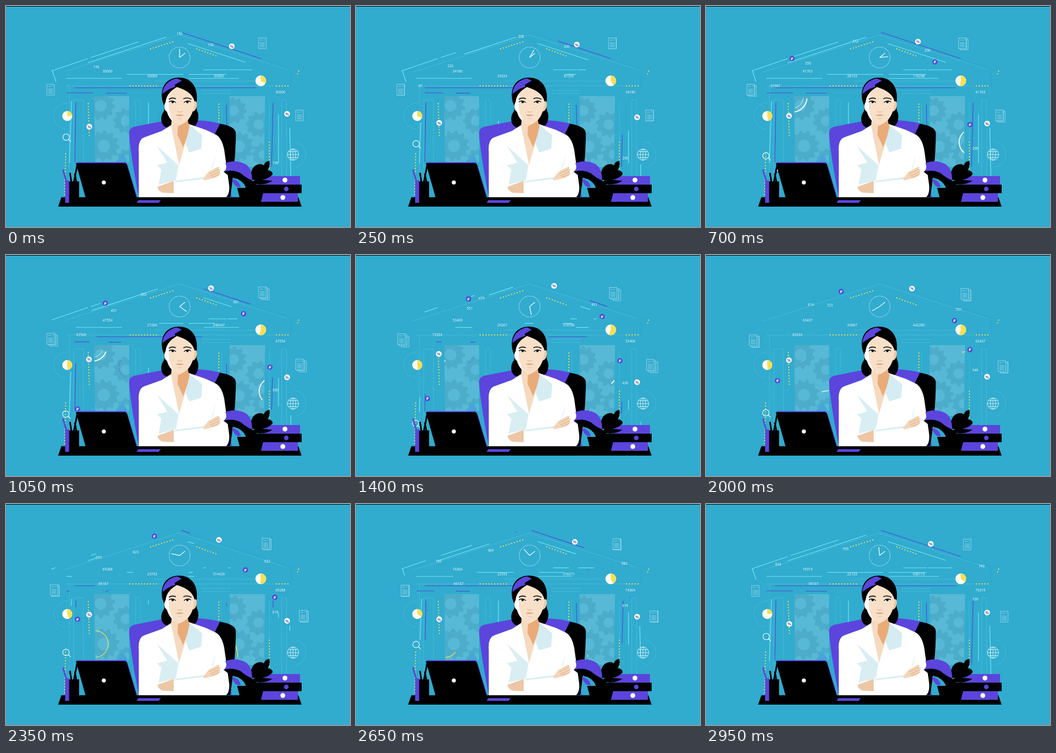
Recreate the animation shown at these times as an HTML page. Size 640 px wide and 412 px high, loop 3020 ms.

```html
<!DOCTYPE html>
<html lang="en">
<head>
<meta charset="utf-8">
<title>Banking office</title>
<style>
  html, body { margin: 0; width: 100%; height: 100%; overflow: hidden; background: #31abce; }
  svg { display: block; width: 100vw; height: 100vh; }
  text { font-family: "Open Sans", "Noto Sans", sans-serif; text-anchor: middle; }
  .num { font-size: 6.4px; fill: #f2ffff; }
  .line { fill: none; stroke-width: 1.2; }
  .dots { fill: none; stroke: #83e6f5; stroke-width: .9; stroke-dasharray: 1 2.4; }
  .gold { fill: none; stroke: #f5e25c; stroke-width: 2.3; stroke-linecap: round; stroke-dasharray: 0 5.4; }
  .icon { fill: none; stroke: #e9fbff; stroke-width: .8; }
  .sheet { fill: none; stroke: #b4e3f0; stroke-width: .7; }
</style>
</head>
<body>
<svg viewBox="0 0 640 412">
  <defs>
    <clipPath id="leftPane"><path d="M164 168H229V291H166Z"/></clipPath>
    <clipPath id="rightPane"><path d="M416 168H482L480 300H417Z"/></clipPath>
    <clipPath id="counterEdge"><rect x="115.5" y="140" width="140" height="20"/></clipPath>
  </defs>
  <rect width="640" height="412" fill="#31abce"/>
  <rect width="640" height="1" fill="#000"/>
  <g id="left" clip-path="url(#leftPane)"><rect x="160" y="165" width="72" height="130" fill="#57b9d5"/></g>
  <g id="right" clip-path="url(#rightPane)"><rect x="412" y="165" width="72" height="140" fill="#57b9d5"/></g>

  <g class="dots">
    <path d="M107 123 322 54 522 118"/>
    <path d="M277 140H465M113 149H230M282 149H500M365 157.500H417M365 163H417"/>
    <path d="M118 356V149M126 356V175H144V290M513 317V175H522V317"/>
    <path d="M241 222V178Q241 174 245.500 174T250 178V218M401 215V180M490 250V180"/>
    <path d="M114 181A24 24 0 0 0 112 229M537 253A24 24 0 0 1 540 300"/>
  </g>
  <path d="M330 51 540 120M530 124V150" class="dots" style="stroke:#2784c4;opacity:.6"/>
  <g class="gold">
    <path d="M269 80 313 66M355 80 391 93M231 149H281M503 149H527M153 182 155 244M396 183V221M111 276 109 353M490 254V306M544.500 121.500 542 128"/>
  </g>
  <g id="scene"></g>
  <g class="icon" transform="translate(534 277)">
    <circle r="10.500"/><ellipse rx="5" ry="10.500"/><path d="M0-10.500V10.500M-10.500 0H10.500M-9-5.500H9M-9 5.500H9"/>
  </g>
  <g class="icon" transform="translate(323 96)">
    <circle r="19.500" stroke-width="1.200" stroke-dasharray="1.200 1.800"/>
    <path d="M0 0 10-8" stroke-width="1.400"/><path id="minute" d="M0 0V-16" stroke-width="1.400"/>
  </g>

  <!-- chair -->
  <path d="M247 356C240 320 231 270 229 238Q228 228 239 225L290 215C330 211 370 211 401 220L420 356Z" fill="#5b45dc"/>
  <path d="M398 219.500Q426 224 427.500 236C428 270 423 320 417 356H390L383 250Z"/>
  <!-- hair and face -->
  <path d="M321 133.500C300 134 288 149 290 171 291 182 297 186 294 196 286 206 287 223 300 227H342C355 226 360 212 357 199 352 190 356 178 355 165 353 145 340 133 321 133.500Z"/>
  <path d="M291 164C292 147 305 137 318 135L327 139 314 147 315 151C304 153 298 159 291 164Z" fill="#5b45dc"/>
  <path d="M309 205 338 208 339 222 352 230 340 262 322 296 301 240 307 224Z" fill="#f5dac0"/>
  <path d="M348 180Q356 173 355 186 353 197 346 197Z" fill="#efc8a5"/>
  <path d="M298 178Q292 184 296 194L302 200Z" fill="#fff4ea"/>
  <path d="M318 151C306 158 298 166 297 180 298 197 302 208 312 217Q322 225 333 218C344 209 349 196 351 180 349 166 337 157 318 151Z" fill="#f8e0c8"/>
  <path d="M304 163C299 169 297 176 297 182 298 197 302 208 311 216 306 205 302 194 303 180Z" fill="#fff"/>
  <path d="M303 174Q309 169.500 316 173M330 173Q337 169.500 345 174" fill="none" stroke="#1a1010" stroke-width="1.800"/>
  <path d="M303 179Q309 174.500 316 180 309 183 303 179ZM331 180Q338 174.500 344 179 338 183 331 180Z" fill="#fff"/>
  <path d="M303 179Q309 174.500 316 180M331 180Q338 174.500 344 179" fill="none" stroke="#000" stroke-width="1.300"/>
  <circle cx="310" cy="179" r="2.300"/><circle cx="337.500" cy="179" r="2.300"/>
  <path d="M319 196.500Q323 199 328 196.500" fill="none" stroke="#dcae88" stroke-width="1.200"/>
  <path d="M315 203.500Q323 201 331 203.500 323 207 315 203.500Z" fill="#dda582"/>
  <path d="M319 210H327" stroke="#eac4a5" stroke-width="1.200"/>
  <!-- jacket -->
  <path d="M247 357V272Q245 249 258 244.500L290 233 307 222 322 296 340 220 372 231 391 240Q402 247 406 268L415 333Q417 350 409 357Z" fill="#fff"/>
  <path d="M307 222 312 217 322 223 332 251 322 295Z" fill="#f5dac0"/>
  <path d="M320 224Q332 219 338 213L340 220 343 228 330 264 319 240Z" fill="#e9ab78"/>
  <path d="M340 235 322 296 330 262Z" fill="#f5dac0"/>
  <path d="M342 222 365 241 363 266 341 273 334 257Z" fill="#d4ecf2"/>
  <path d="M281 261 321 297 316 325 284 333 289 305 281 297 300 292ZM385 300 391 276 382 304ZM315 326 368 319 371 322 314 329Z" fill="#d9eef3"/>
  <path d="M282 337 312 326V349L291 348Q282 344 282 337Z" fill="#edc7a5"/>
  <path d="M366 323 377 309 394 300Q399 299 396 304L400 305 397 309 399 313 392 319 370 325Z" fill="#f3d5b8"/>
  <path d="M378 313 396 304M380 317 398 309M382 320 397 314" stroke="#dcaa83" fill="none"/>
  <!-- desk -->
  <path d="M103 356.500H544L550 374H97Z"/>
  <path d="M246 362H288L284 367H243Z" fill="#5b45dc"/>
  <path d="M106 305 114 333" stroke="#5b45dc" stroke-width="3"/>
  <path d="M119 311 122 331M133 294 126 330M128 312 131 329" stroke="#000" stroke-width="3"/>
  <path d="M116 327H136V358H116Z"/>
  <path d="M110 325H117.500V367H110Z" fill="#5b45dc"/>
  <path d="M130 291H222L226 296 244 356H241Z" fill="#5b45dc"/>
  <path d="M130 293H221Q224 293 225 296L243 357H148Z"/>
  <circle cx="182" cy="329" r="3.800" fill="#fff"/>
  <!-- books -->
  <path d="M482 317H547V334H478Z" fill="#5b45dc"/>
  <path d="M464 333H550V349H464Z"/>
  <path d="M478 349H543V365H474Z" fill="#5b45dc"/>
  <circle cx="519" cy="324.500" r="4.500" fill="#fff"/>
  <circle cx="521.500" cy="341" r="4.300" fill="#5b45dc"/>
  <circle cx="515" cy="357" r="4.500" fill="#fff"/>
  <!-- plant -->
  <path d="M430 339H481L474 366H437Z"/>
  <path d="M405 309Q424 301 440 309 455 314 459 327L466 323 478 324 496 326Q480 335 466 332L462 343H447Q446 331 432 323 417 320 405 309Z"/>
  <path d="M458 324Q452 308 463 298 472 292 480 297 482 289 490 289 492 298 487 306 497 308 496 314 486 325 466 325Z"/>
  <path d="M404 309Q413 304 408 293 428 285 446 295 458 303 458 325 447 321 437 312 422 304 404 309ZM420 322Q433 324 437 337 426 341 420 322Z" fill="#5b45dc"/>
</svg>
<script>
const LOOP = 3020, STEP = 50;
const CYAN = '#72e9f4', PURPLE = '#4d4cda', WHITE = '#f2fdff', GOLD = '#f5e25c';
const scene = document.getElementById('scene');
const updates = [];

const clamp = v => Math.max(0, Math.min(1, v));
const mix = (a, b, p) => a + (b - a) * p;
const swing = t => Math.min(t, 3000 - t);

function el(tag, attrs = {}, parent = scene) {
  const node = document.createElementNS('http://www.w3.org/2000/svg', tag);
  for (const key in attrs) node.setAttribute(key, attrs[key]);
  parent.appendChild(node);
  return node;
}
const place = (node, x, y, scale = 1) =>
  node.setAttribute('transform', `translate(${x} ${y}) scale(${scale})`);
const polar = (cx, cy, r, deg) => {
  const a = deg * Math.PI / 180;
  return [cx + r * Math.cos(a), cy + r * Math.sin(a)];
};

// Gears
function gear(pane, x, y, r, teeth, turn) {
  const points = [];
  for (let i = 0; i < teeth * 4; i++)
    points.push(polar(0, 0, i % 4 < 2 ? r : r * .82, i * 90 / teeth));
  const hole = r * .4;
  const node = el('path', { d: `M${points.join('L')}ZM${hole} 0A${hole} ${hole} 0 1 0 ${-hole} 0A${hole} ${hole} 0 1 0 ${hole} 0Z`,
    fill: '#48a8c6', 'fill-rule': 'evenodd', opacity: .75 }, pane);
  updates.push(t => node.setAttribute('transform', `translate(${x} ${y}) rotate(${turn * t / 3000})`));
}
const left = document.getElementById('left'), right = document.getElementById('right');
gear(left, 176, 186, 27, 11, 65);
gear(left, 223, 214, 24, 10, -72);
gear(left, 182, 261, 29, 12, 60);
gear(left, 225, 285, 19, 9, -80);
gear(right, 423, 195, 25, 11, -65);
gear(right, 470, 221, 24, 10, 72);
gear(right, 433, 262, 28, 12, -60);
gear(right, 479, 277, 22, 10, 72);
el('path', { d: 'M203 292 218 276 227 292Z', fill: '#46a5da' }, left);

// Arcs that draw on and wipe off inside the panes
function arc(pane, cx, cy, r, a0, a1, start, end, color, width = 1.4, dash = 'none') {
  const node = el('path', { fill: 'none', stroke: color, 'stroke-width': width, 'stroke-dasharray': dash }, pane);
  updates.push(t => {
    const p = (t - start) / (end - start);
    const from = mix(a0, a1, clamp(p * 2 - 1)), to = mix(a0, a1, clamp(p * 4));
    node.setAttribute('d', p > 0 && p < 1
      ? `M${polar(cx, cy, r, from)}A${r} ${r} 0 0 1 ${polar(cx, cy, r, to)}` : '');
  });
}
arc(left, 235, 215, 18, 130, 230, -300, 500, '#72c9e3', 1);
arc(left, 160, 170, 28, 5, 85, 450, 1450, WHITE, 2);
arc(left, 160, 170, 21, 5, 75, 450, 1400, WHITE, .8);
arc(left, 232, 208, 22, 115, 240, 850, 1500, PURPLE, 1.2, '1.5 2.5');
arc(left, 160, 170, 34, 0, 60, 1400, 2100, WHITE, 1.2, '1.2 3');
arc(left, 228, 288, 35, 205, 270, 1500, 2100, WHITE);
arc(left, 165, 261, 25, -85, 85, 2050, 2750, GOLD, 1.2);
arc(right, 496, 254, 25, 125, 235, 450, 1500, WHITE, 1.8);
arc(right, 487, 228, 48, 216, 265, 1450, 2050, GOLD);
arc(right, 385, 283, 46, -30, 3, 2150, 2700, GOLD);

// Solid strokes: trimmed to [s1,e1] early and [s2,e2] later, wiped out, then redrawn
function line(x1, y1, x2, y2, color, s1 = 0, e1 = 1, s2 = .2, e2 = .85) {
  const node = el('path', { class: 'line', stroke: color });
  const keys = [[0, 0, 1], [250, s1, e1], [700, 0, 1], [1050, s2, e2], [1600, 1, 1]];
  updates.push(t => {
    let s = 0, e = 0;
    if (t < 1600) {
      const i = keys.findIndex(k => k[0] > t);
      const [a, b] = [keys[i - 1], keys[i]], p = (t - a[0]) / (b[0] - a[0]);
      s = mix(a[1], b[1], p);
      e = mix(a[2], b[2], p);
    } else if (t > 2250) e = clamp((t - 2250) / 550) ** 1.3;
    const at = p => `${mix(x1, x2, p)} ${mix(y1, y2, p)}`;
    node.setAttribute('d', e - s > .01 ? `M${at(s)}L${at(e)}` : '');
  });
}
line(86, 120, 93, 141, CYAN, 0, 1, 1, 1);
line(85, 121, 152, 98, CYAN, 0, 1, 0, 1);
line(158, 96, 246, 67, CYAN, 0, .32, 0, .2);
line(152, 106, 298, 58, CYAN, .34, 1, .05, .89);
line(326, 49, 474, 98, PURPLE, .34, 1, .28, .87);
line(338, 70, 446, 105, CYAN, 0, .88, .27, .75);
line(112, 135, 216, 135, CYAN, 0, 1, .18, 1);
line(225, 127.5, 330, 127.5, CYAN, 1, 1, .57, 1);
line(340, 127.5, 410, 127.5, CYAN, .7, 1, 0, .7);
line(340, 135, 433, 135, CYAN, 1, 1, .3, 1);
line(367, 119, 411, 119, CYAN, 0, 1, .22, 1);
line(413, 119, 458, 119, CYAN, 0, .33, 0, .38);
line(128, 152.5, 466, 152.5, PURPLE, 0, .49, .12, .7);
line(113, 162, 162, 162, PURPLE, .3, 1, .3, .86);
line(186, 162.5, 225, 162.5, PURPLE, 0, .67, .13, .72);
line(130, 180, 128, 291, PURPLE, 0, 1, .2, 1);
line(122, 177, 118, 293, CYAN, .35, 1, .35, 1);
line(265, 180, 265, 245, CYAN, .52, 1, .46, 1);
line(410, 184, 411, 245, PURPLE, 0, 1, .3, 1);
line(497, 180, 494, 300, PURPLE, .5, 1, .4, .9);
line(507, 202, 507, 293, CYAN, .33, 1, .3, .88);
line(528, 227, 530, 317, CYAN, .76, 1, .8, 1);

// Counters: value and position are linear in time
function counter(value, rate, x, y, vx = 0, vy = 0, parent = scene) {
  const node = el('text', { class: 'num' }, parent);
  updates.push(t => {
    node.textContent = Math.round(value + rate * t);
    node.setAttribute('x', x + vx * t);
    node.setAttribute('y', y + 2.3 + vy * t);
  });
}
counter(30000, 16.7184, 189, 122);
counter(30000, 16.7184, 510.5, 161);
counter(30000, -8 / 3, 272, 131);
counter(30000, 206.14, 396, 131);
counter(150, .2319, 323, 51.5, -.064, .0207);
counter(150, .2864, 168, 114, .0312, -.0102);
counter(150, .2007, 381, 72.5, .0447, .0146);
counter(150, .1997, 501, 293, 0, -.039);
counter(50000, 50 / 3, 107, 149, .0316, 0, el('g', { 'clip-path': 'url(#counterEdge)' }));

// Round badges
function badge(sign, disc, ink, radius, move) {
  const node = el('g');
  el('circle', { r: radius, fill: disc }, node);
  el('text', { y: 2.8, 'font-size': radius * 1.45, fill: ink, 'font-weight': 600 }, node).textContent = sign;
  updates.push(t => place(node, ...move(t)));
}
const percent = (x, y, vx, vy) =>
  badge('%', '#fff', '#4a3f9f', 5.3, t => [x + vx * swing(t), y + vy * swing(t)]);
percent(420, 75, -.0367, -.0125);
percent(155, 225, -.0007, -.029);
percent(523, 201, 0, .0257);

const pop = t => Math.min(clamp((t - 400) / 200), clamp((2700 - t) / 200));
const rouble = path => badge('₽', PURPLE, '#fff', 4.9, t => [...path(t), pop(t)]);
rouble(t => [111 + .0703 * t, 114 - .023 * t]);
rouble(t => t < 1760 ? [394 + .0457 * t, 94 + .0148 * t] : [474 - .0485 * (t - 1760), Math.min(123, 120 + (t - 1760) * .01)]);
rouble(t => t < 2070 ? [491, 245 - .0342 * t] : [491 + .0325 * (t - 2070), 174]);
rouble(t => [133, 345.5 - .0556 * t]);

// Paper stacks: sheets slide back one after another, hidden while they coincide with the front one
function papers(x, y) {
  const shift = (t, start, span) => clamp((t - start) / span);
  const front = t => shift(t, 1150, 1700);
  const moves = [t => shift(t, 200, 1300), t => shift(t, 650, 1500), front];
  for (const move of moves) {
    const sheet = el('g', { class: 'sheet' });
    el('rect', { x: -7, y: -10, width: 14, height: 20, fill: '#31abce' }, sheet);
    el('path', { d: 'M-4.500-6H1M-4.500-1H4.500M-4.500 1.500H4.500M-4.500 4H4.500M-4.500 6.500H4.500M3-6.500H5' }, sheet);
    updates.push(t => {
      const p = move(t);
      place(sheet, x + 9 * p, y + 6 * p);
      sheet.setAttribute('visibility', move === front || p - front(t) > .02 ? 'visible' : 'hidden');
    });
  }
}
papers(83, 156);
papers(477, 69.5);
papers(546, 204);

// Pie charts
function pie(x, y, r, small, large) {
  el('circle', { cx: x, cy: y, r, fill: '#fffdf2' });
  const wedge = el('path', { fill: '#f7df55' });
  updates.push(t => {
    const sweep = mix(small, large, clamp(swing(t) / 800));
    wedge.setAttribute('d',
      `M${x} ${y}V${y - r}A${r} ${r} 0 ${+(sweep > 180)} 1 ${polar(x, y, r, sweep - 90)}Z`);
  });
}
pie(114, 205, 9.3, 85, 175);
pie(474, 139.5, 10, 120, 200);

const lens = el('path', { class: 'icon', d: 'M6 0A6 6 0 1 1-6 0 6 6 0 1 1 6 0M4.300 4.300 9 8.500', style: 'stroke-width:1.200' });
updates.push(t => place(lens, 112 - .0007 * swing(t), 244.5 + .0495 * swing(t)));

const minute = document.getElementById('minute');
updates.push(t => minute.setAttribute('transform', `rotate(${t * .12})`));

function draw(now) {
  const t = Math.floor(now % LOOP / STEP) * STEP;
  for (const update of updates) update(Math.min(t, 2950));
}
const origin = performance.now();
(function frame() {
  draw(performance.now() - origin);
  requestAnimationFrame(frame);
})();
</script>
</body>
</html>
```
